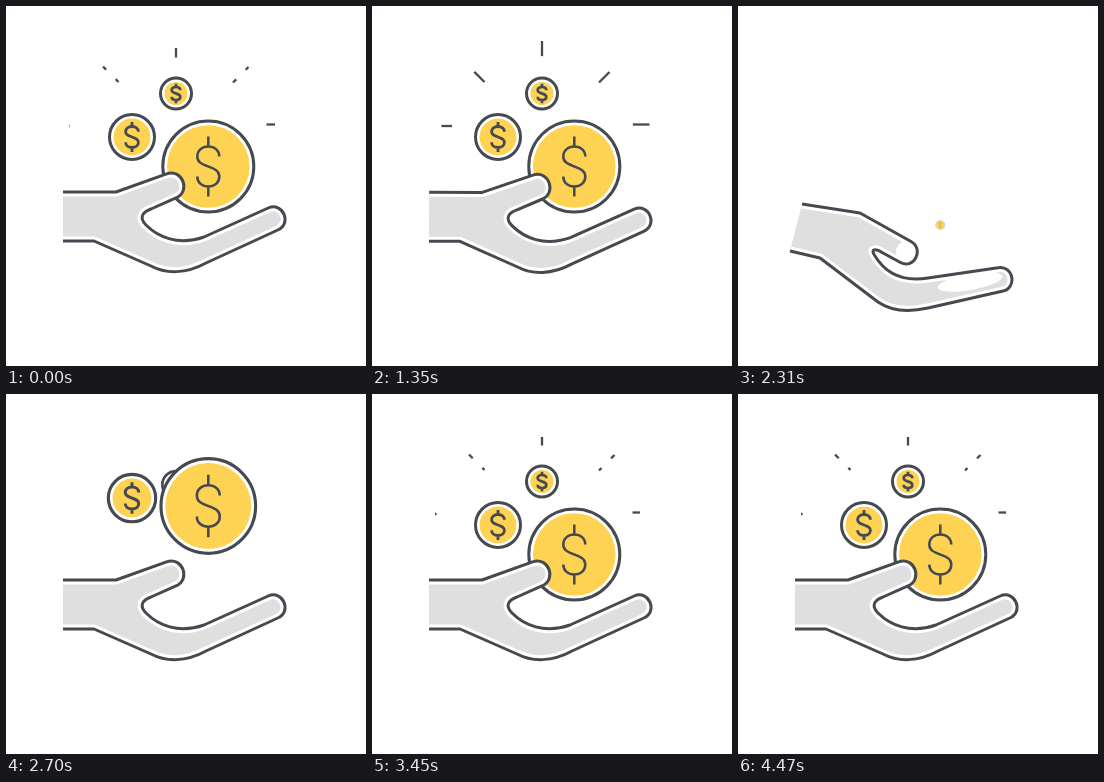
An HTML page that plays this animation: 360 px wide and 360 px high, repeating every 4500 ms.

```html
<!DOCTYPE html>
<html lang="en">
<head>
<meta charset="utf-8">
<title>Coins in hand</title>
<style>
html, body { margin: 0; width: 100%; height: 100%; overflow: hidden; background: #fff; }
svg { display: block; width: 100vw; height: 100vh; }
.ink { fill: none; stroke: #454950; stroke-width: 3; stroke-linejoin: round; }
.gap { fill: none; stroke: #fff; stroke-width: 9; stroke-linejoin: round; }
.ray { stroke-width: 2.3; }
</style>
</head>
<body>
<svg viewBox="0 0 360 360">
  <defs><clipPath id="inside"><path class="hand"/></clipPath></defs>
  <g id="rays"></g>
  <g id="coins"></g>
  <path class="hand" fill="#dfdfdf"/>
  <g clip-path="url(#inside)">
    <ellipse id="fingerShine" fill="#fff"/>
    <ellipse id="thumbShine" fill="#fff"/>
    <path class="hand gap"/>
  </g>
  <path class="hand ink"/>
</svg>
<script>
const LOOP = 4500, STEP = 30;
const $ = id => document.getElementById(id);
const clamp = x => Math.min(1, Math.max(0, x));
const span = (t, a, b) => clamp((t - a) / (b - a));
const mix = (a, b, u) => a + (b - a) * u;
const smooth = u => (1 - Math.cos(Math.PI * u)) / 2;
const sineOut = u => Math.sin(Math.PI / 2 * u);
const backIn = u => u * u * (2.70158 * u - 1.70158);

function add(parent, tag, attrs) {
  const el = document.createElementNS('http://www.w3.org/2000/svg', tag);
  set(el, attrs);
  parent.appendChild(el);
  return el;
}
function set(el, attrs) {
  for (const k in attrs) el.setAttribute(k, attrs[k]);
}

// Hand outline: raised, halfway, lowered
const HAND_CMD = 'MLLC--LC--C--LC--LC--LL';
const raised = [57,186, 110,186, 160.6,167.8, 176.6,162, 185.4,186.2, 169.4,192.2,
  145,203, 136,206, 133,212, 140,219, 152,231, 172,240, 198,231, 262.2,202,
  276.8,195.6, 286.4,217.6, 271.8,224, 200,257, 180,268, 160,268, 145,260, 88,235, 57,235];
const halfway = [61,193, 118,198, 171,206.5, 187,208.5, 184,232.4, 168,230.4,
  146,229, 136,229, 133,233, 139,239, 150,252, 168,261, 190,257, 263,238,
  278.5,234, 284.5,257, 269,261, 200,284, 180,292, 162,291, 146,282, 85,245, 55,241];
const lowered = [64,198, 122,207, 173,235.5, 186.5,243, 176,264, 162.5,256.5,
  145,247, 137,242, 132,243, 137,250, 148,268, 165,276, 190,272, 260,261.7,
  275.7,259, 279.7,282.6, 264,285.3, 190,302, 170,306.5, 153,305, 140,296, 82,252, 52,245];
const handPaths = document.querySelectorAll('.hand');

function drawHand(t) {
  const p = 2 * smooth(span(t, 1290, 2010)) * (1 - smooth(span(t, 2320, 2660)));
  const low = p > 1, u = low ? p - 1 : p;
  const from = low ? halfway : raised, to = low ? lowered : halfway;
  let d = '';
  for (let i = 0; i < HAND_CMD.length; i++) {
    const c = HAND_CMD[i], k = 2 * i;
    d += (c === '-' ? ' ' : c) + mix(from[k], to[k], u).toFixed(2) + ' ' + mix(from[k + 1], to[k + 1], u).toFixed(2);
  }
  handPaths.forEach(el => el.setAttribute('d', d));

  const deep = low ? u : 0, grow = span(p, 0.7, 1);
  const x = mix(258, 232, deep), y = mix(251, 276, deep);
  set($('fingerShine'), { cx: x, cy: y, rx: mix(12, 33, deep) * grow, ry: mix(5, 8, deep) * grow, transform: `rotate(-10 ${x} ${y})` });
  set($('thumbShine'), { cx: 168, cy: mix(219, 246, deep), rx: 10 * deep, ry: 11 * deep });
}

// Coins, back to front
function dollar(w, s, h) {
  const q = s / 2, b = w * 0.55;
  return `M${w} ${-q}C${w} ${-s * 0.82} ${b} ${-s} 0 ${-s}S${-w} ${-s * 0.82} ${-w} ${-q}` +
    `C${-w} ${-s * 0.2} ${-b} ${-s * 0.12} 0 0S${w} ${s * 0.2} ${w} ${q}` +
    `C${w} ${s * 0.82} ${b} ${s} 0 ${s}S${-w} ${s * 0.82} ${-w} ${q}M0 ${-h}V${-s}M0 ${s}V${h}`;
}
const coins = [
  { x: 170, y: 87.5, r: 15.5, core: 11.5, sign: [4.3, 6.5, 9.7], pen: 2.7, out: 1540, rise: 2400, top: 2880, peak: 33, rest: 3210, big: 1.06 },
  { x: 126, y: 131, r: 22.5, core: 18.5, sign: [6.4, 10.5, 15], pen: 2.8, out: 1440, rise: 2340, top: 2760, peak: 98, rest: 3120, big: 1.08 },
  { x: 202.3, y: 160.5, r: 45.5, core: 41.3, sign: [11, 20, 30], pen: 2.5, out: 1340, rise: 2285, top: 2700, peak: 112, rest: 3060, big: 1.04 }
];
for (const c of coins) {
  c.el = add($('coins'), 'g', {});
  add(c.el, 'circle', { r: c.r, class: 'ink', style: 'fill:#fff' });
  add(c.el, 'circle', { r: c.core, fill: '#fed354' });
  add(c.el, 'path', { d: dollar(...c.sign), class: 'ink', style: `stroke-width:${c.pen}` });
}

function drawCoin(c, t) {
  let y = c.y, s;
  if (t < c.rise) {
    s = 1 - backIn(span(t, c.out, c.out + 450));
  } else {
    const settle = smooth(span(t, c.top, c.rest));
    y = mix(mix(220, c.peak, smooth(span(t, c.rise, c.top))), c.y, settle);
    s = mix(c.big * sineOut(span(t, c.rise, c.top)), 1, settle);
  }
  set(c.el, { transform: `translate(${c.x} ${y}) scale(${s})`, visibility: s > 0.005 ? 'visible' : 'hidden' });
}

// Rays: dashes running outward
const DASH = 18.5, BEAT = 1020;
const rays = [
  { d: 'M170 51.5V35', lead: 9.5, pitch: 32 },
  { d: 'M112.5 76L97 60.5', lead: 4, pitch: 32 },
  { d: 'M227 76.5L242.5 61', lead: 4.5, pitch: 32 },
  { d: 'M80 120H63', lead: -1, pitch: 36 },
  { d: 'M260.5 118.5H277.5', lead: 8.5, pitch: 32 }
];
for (const r of rays) {
  r.el = add($('rays'), 'path', { d: r.d, class: 'ink ray', 'stroke-dasharray': `${DASH} ${r.pitch - DASH}` });
}

function drawRays(t) {
  const beat = (t < LOOP / 2 ? t : t - LOOP) / BEAT;
  for (const r of rays) r.el.setAttribute('stroke-dashoffset', DASH - r.lead - r.pitch * beat);
  $('rays').setAttribute('opacity', 1 - span(t, 1350, 1500) + span(t, 3180, 3300));
}

function draw(ms) {
  const t = Math.floor((ms % LOOP) / STEP) * STEP;
  drawRays(t);
  coins.forEach(c => drawCoin(c, t));
  drawHand(t);
}

let start = null;
function tick(now) {
  if (start === null) start = now;
  draw(Math.max(0, now - start));
  requestAnimationFrame(tick);
}
draw(0);
requestAnimationFrame(tick);
</script>
</body>
</html>
```
